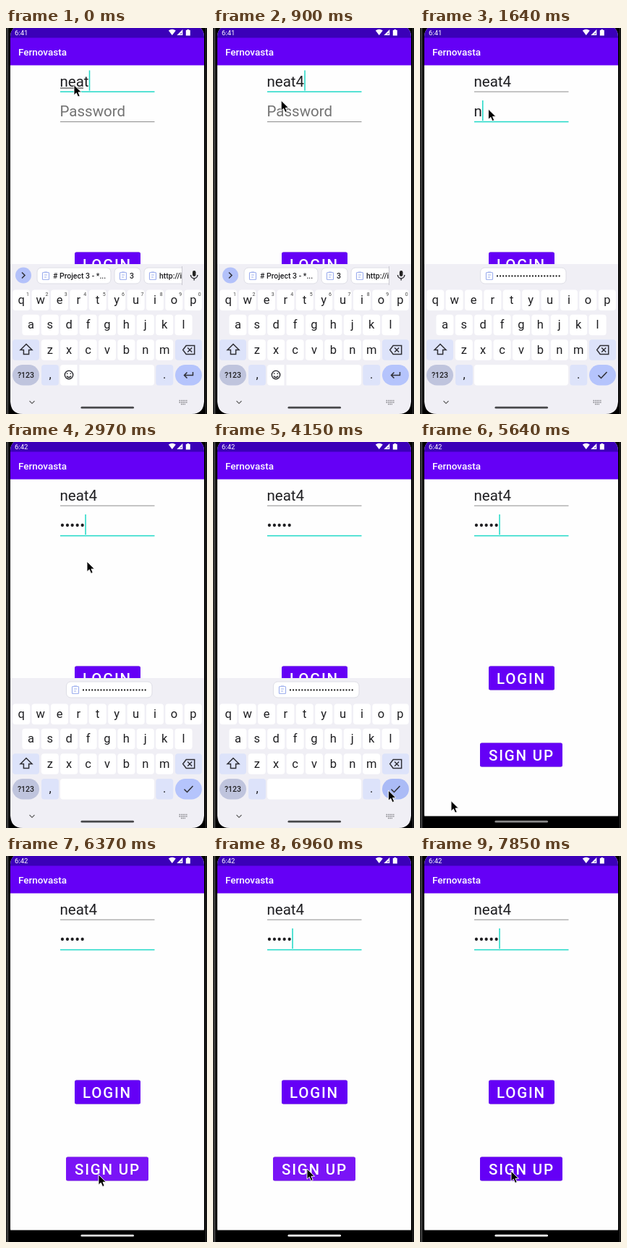
These frames come from a looping animation (278x533 px, 7.99 s). An HTML page:

```html
<!DOCTYPE html>
<html lang="en">
<head>
<meta charset="utf-8">
<title>Login screen</title>
<style>
  html, body { margin: 0; width: 100%; height: 100%; overflow: hidden; background: #000; }
  svg { display: block; width: 100%; height: 100%; font-family: Roboto, Arial, sans-serif; }
  text { fill: #1f1f22; white-space: pre; }
  .mid { text-anchor: middle; }
  .field { font-size: 20.5px; }
  .hint { fill: #737373; }
  .button { font-size: 20.5px; font-weight: 500; letter-spacing: 1.8px; fill: #fff; }
  .key { font-size: 16.5px; }
  .digit { font-size: 7px; fill: #444; }
  .chip { font-size: 10.5px; font-weight: 500; }
  .line { fill: none; stroke: #303036; stroke-width: 1.5; }
  .clip { fill: none; stroke: #a0b1ee; stroke-width: 1.2; }
  .lift { filter: drop-shadow(0 .6px .7px rgba(0, 0, 0, .3)); }
</style>
</head>
<body>
<svg viewBox="0 0 278 533">
  <defs>
    <linearGradient id="bezel">
      <stop offset="0" stop-color="#111"/>
      <stop offset=".4" stop-color="#484848"/>
      <stop offset=".65" stop-color="#000"/>
    </linearGradient>
    <g id="clipboard" class="clip">
      <rect x="-4.500" y="-4.500" width="9" height="10" rx="1"/>
      <path d="M-2-5h4M-2-1h4M-2 2h3"/>
    </g>
    <clipPath id="screen">
      <path d="M11 0H269Q274 4 274 12V514Q274 533 257 533H23Q6 533 6 514V12Q6 4 11 0Z"/>
    </clipPath>
    <clipPath id="strip"><path d="M6 326H243V358H6Z"/></clipPath>
  </defs>

  <rect width="278" height="533"/>
  <rect width="6" height="533" fill="url(#bezel)"/>
  <path d="M276.500 0V533" stroke="#333"/>

  <g clip-path="url(#screen)">
    <rect x="6" width="268" height="516.600" fill="#fefefe"/>
    <rect x="6" width="268" height="14" fill="#3b00b8"/>
    <rect x="6" y="13.500" width="268" height="38" fill="#6500f6"/>
    <text id="clock" x="12" y="9.700" font-size="9.500" style="fill:#fff"></text>
    <g fill="#fff" transform="translate(-.7 0)">
      <path d="M225.500 3.500Q230.500 0 235.500 3.500L230.500 10Z"/>
      <path d="M237 10L245 2V10Z"/>
      <path d="M249.500 3H251V2h3v1h1.500V10.500h-6Z"/>
      <path d="M241.500 8.500l2-2v2Z" fill="#3b00b8"/>
    </g>
    <text x="17" y="38" font-size="13.500" font-weight="500" style="fill:#fff">Fernovasta</text>

    <text id="name" class="field" x="74.500" y="81"></text>
    <path id="composing" stroke="#222" stroke-width="1.200"/>
    <path id="nameLine"/>
    <text id="pass" class="field" x="74.500" y="122"></text>
    <path id="passLine"/>
    <rect id="caret" width="1.500" height="28" fill="#1fd8c6"/>

    <rect class="lift" x="95" y="309.500" width="91" height="33" rx="2.500" fill="#6500f6"/>
    <text class="button" x="106" y="334">LOGIN</text>
    <rect id="signup" class="lift" x="83" y="415.500" width="114" height="33" rx="2.500"/>
    <text class="button" x="95" y="440">SIGN UP</text>

    <g id="keyboard">
      <rect x="6" y="326" width="268" height="207" fill="#f0eff5"/>
      <g id="nameStrip">
        <circle cx="24" cy="341.500" r="11" fill="#b3c1fa"/>
        <path class="line" d="M22 337.500l4 4-4 4"/>
        <g clip-path="url(#strip)">
          <g fill="#fff" stroke="#dedee6">
            <rect x="43" y="331" width="102" height="22" rx="6"/>
            <rect x="150" y="331" width="36" height="22" rx="6"/>
            <rect x="191" y="331" width="70" height="22" rx="6"/>
          </g>
          <use href="#clipboard" x="55" y="342"/>
          <use href="#clipboard" x="162" y="342"/>
          <use href="#clipboard" x="203" y="342"/>
          <text class="chip" x="65" y="346"># Project 3 - *...</text>
          <text class="chip" x="171" y="346">3</text>
          <text class="chip" x="212" y="346">http://i</text>
        </g>
        <path d="M243.500 329V355" stroke="#c9c9d0"/>
        <rect x="258" y="335" width="4.500" height="8" rx="2.200" fill="#222"/>
        <path class="line" d="M255.500 341a4.700 4.700 0 0 0 9.400 0M260.200 345.500v3"/>
      </g>
      <g id="passStrip">
        <rect x="83.500" y="331" width="118.500" height="22" rx="6" fill="#fff" stroke="#dedee6"/>
        <use href="#clipboard" x="96" y="342"/>
        <path d="M107 342.500H193" stroke="#222" stroke-width="2.300" stroke-linecap="round" stroke-dasharray="0 4.080"/>
      </g>
      <g id="keys"></g>
      <g id="digits"></g>
      <rect x="75" y="465" width="130" height="28.500" rx="4" fill="#fff"/>
      <g id="emoji">
        <rect x="98.500" y="463" width="3" height="32" fill="#f0eff5"/>
        <circle class="line" cx="87" cy="479" r="5.700"/>
        <path class="line" d="M84 480.500q3 4 6 0M84.700 476.500v1.500M89.300 476.500v1.500"/>
      </g>
      <rect id="enter" x="234" y="465" width="37" height="28.500" rx="14.200"/>
      <path id="enterIcon" class="line"/>
      <path class="line" d="M28 436.500L20 444.500h4.400v6h7.200v-6H36Z"/>
      <path class="line" d="M244.700 444.500l4.500-6h11.500v12h-11.500ZM251.200 441.500l6 6M257.200 441.500l-6 6"/>
      <rect id="ripple" x="13" y="500" width="45" height="34" rx="16.500" fill="#d6d6d9"/>
      <path id="hide" class="line" style="stroke:#666;stroke-width:1.200" d="M32.500 515l3.500 3.500 3.500-3.500"/>
      <path d="M239.500 514.500h11M239.500 517h11M242 519.500h6" stroke="#85858a" stroke-width="1.300" stroke-dasharray="1.500 .9"/>
    </g>
  </g>

  <rect id="handle" x="103.500" y="522.800" width="73.500" height="2.800" rx="1.400"/>
  <path id="mouse" d="M0 0V14.200L3.300 11.200L5.600 16.500L8.200 15.400L6 10.300H10.400Z" stroke="#fff" stroke-width=".9"/>
</svg>
<script>
  const LOOP = 7990, TICK = 148, BLINK = 500, BLINK_START = 2570;
  const NAME = "neat4";
  const $ = id => document.getElementById(id);
  const set = (id, attrs) => {
    for (const k in attrs) $(id).setAttribute(k, attrs[k]);
  };
  const show = (id, on) => { $(id).style.display = on ? "" : "none"; };

  // Keyboard
  const PITCH = 26.4;
  const key = (x, y, w, label, fill = "#fff", r = 4, cls = "key") =>
    `<rect x="${x}" y="${y}" width="${w}" height="28.5" rx="${r}" fill="${fill}"/>` +
    `<text class="${cls} mid" x="${x + w / 2}" y="${y + (cls === "key" ? 19.2 : 18)}">${label}</text>`;
  const row = (letters, left, y) =>
    [...letters].map((c, i) => key(left + i * PITCH, y, 24, c)).join("");
  const SOFT = "#dde3fa";
  $("keys").innerHTML =
    row("qwertyuiop", 9.2, 361.5) + row("asdfghjkl", 22.4, 395.7) + row("zxcvbnm", 48.8, 430.3) +
    key(9, 430.3, 37, "", SOFT) + key(234, 430.3, 37, "", SOFT) +
    key(9, 465, 37, "?123", "#bfc4dd", 14.2, "chip") +
    key(49, 465, 24, ",", SOFT) + key(207.3, 465, 24, ".", SOFT);
  $("digits").innerHTML = [..."1234567890"].map((d, i) =>
    `<text class="digit mid" x="${30 + i * PITCH}" y="369.5">${d}</text>`).join("");

  // Pointer stops: tick, x, y
  const PATH = [
    [0, 94, 78.5], [4, 94, 78.5], [5, 94, 88], [7, 94.5, 112], [19, 94.5, 112],
    [20, 112, 165], [21, 175, 300], [22, 227, 408], [23, 227, 408],
    [24, 238, 455], [25, 242, 478], [28, 242.5, 481], [29, 242, 490], [31, 234, 515],
    [32, 195, 519], [34, 60, 518], [35, 33, 513], [37, 31.5, 512.5], [38, 43, 495.5],
    [39, 108, 466], [41, 122, 456], [42, 122, 456], [43, 128, 440],
    [45, 130, 432], [49, 130, 432], [51, 127, 434], [53, 126, 435]
  ];
  const pointer = n => {
    const i = Math.max(1, PATH.findIndex(p => p[0] >= n));
    const [a, b] = [PATH[i - 1], PATH[i]];
    const k = (n - a[0]) / (b[0] - a[0]);
    return [1, 2].map(j => a[j] + (b[j] - a[j]) * k);
  };

  const TYPED = [11, 13, 14, 16, 18];
  const password = n => {
    const len = TYPED.filter(k => n >= k).length;
    if (!len) return "";
    return n >= 20 ? "•".repeat(len) : "•".repeat(len - 1) + NAME[len - 1];
  };

  const underline = (id, y, active) => set(id, {
    d: `M75 ${y}H205.500`,
    stroke: active ? "#1fd8c6" : "#8c8c8c",
    "stroke-width": active ? 1.5 : 1
  });

  const handleColor = n => {
    if (n < 37) return "#47474a";
    const v = Math.round(Math.min(255, 138 + Math.max(0, n - 38) * 17));
    return `rgb(${v},${v},${v})`;
  };

  function draw(time) {
    const n = Math.floor(time / TICK), t = n * TICK;
    const inPass = n >= 7, passKeys = n >= 8;

    $("clock").textContent = n < 20 ? "6:41" : "6:42";
    $("name").textContent = n < 4 ? NAME.slice(0, 4) : NAME;
    show("composing", n < 4);
    set("composing", { d: `M75 83H${n < 2 ? 107 : 115}` });
    underline("nameLine", 88, !inPass);
    underline("passLine", 129.5, inPass);

    const typed = password(n);
    $("pass").textContent = typed || "Password";
    $("pass").classList.toggle("hint", !typed);

    const width = inPass ? (typed ? $("pass").getComputedTextLength() : 0)
                         : $("name").getComputedTextLength();
    set("caret", { x: 74.7 + width, y: inPass ? 100 : 58.5 });
    show("caret", t < BLINK_START || Math.floor((t + 20 - BLINK_START) / BLINK) % 2 === 0);

    show("nameStrip", !passKeys);
    show("digits", !passKeys);
    show("emoji", !passKeys);
    show("passStrip", passKeys);
    set("enter", { fill: n >= 25 && n <= 29 ? "#abbbf6" : "#b5c4fc" });
    set("enterIcon", {
      d: passKeys ? "M246.500 479.500l4 4 8-8.500" : "M258.500 475v4.500H247M250.500 475.500l-4 4 4 4"
    });
    show("ripple", n >= 35 && n <= 37);
    show("hide", n < 35);
    show("keyboard", n < 38);
    set("keyboard", { transform: `translate(0 ${n === 37 ? 90 : 0})` });

    set("signup", { fill: n >= 43 && n < 48 ? "#7a14f6" : "#6500f6" });
    set("handle", { fill: handleColor(n) });
    set("mouse", { transform: `translate(${pointer(n).join(" ")})` });
  }

  const start = performance.now();
  function frame() {
    draw((performance.now() - start) % LOOP);
    requestAnimationFrame(frame);
  }
  frame();
</script>
</body>
</html>
```
